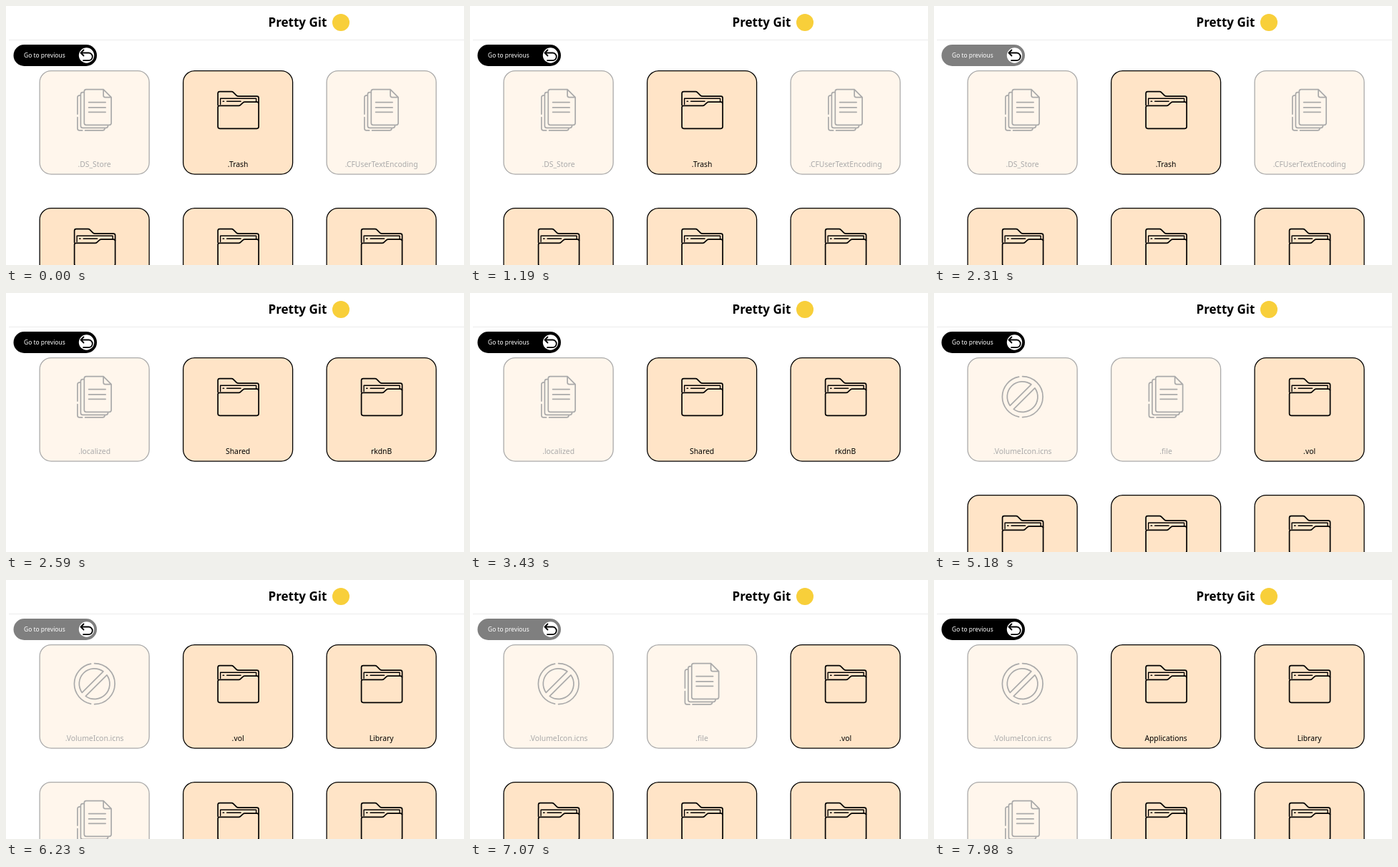
An HTML page that plays this animation: 640 by 362 pixels, repeating every 8000 ms.

```html
<!DOCTYPE html>
<html lang="en">
<head>
<meta charset="utf-8">
<title>Pretty Git</title>
<style>
  html, body { margin: 0; width: 100%; height: 100%; overflow: hidden; background: #fff; }
  svg { display: block; width: 640px; height: 362px; font-family: "Noto Sans", sans-serif; }
  .card { stroke: #000; stroke-width: 1.3; fill: #ffe4c7; }
  .icon { fill: none; stroke: #000; stroke-width: 1.7; stroke-linecap: round; stroke-linejoin: round; }
  .label { font-size: 10.35px; text-anchor: middle; }
  .off { opacity: .33; }
</style>
</head>
<body>
<svg viewBox="0 0 640 362">
  <defs>
    <!-- icons are drawn around the card's top centre -->
    <g id="folder" class="icon">
      <path d="M-28 48V31.500Q-28 29 -25.500 29H-9Q-7.500 29 -6.500 30L-2 34.500Q-1 35.500 1 35.500H26.500Q29 35.500 29 38V45"/>
      <path d="M-24.500 47V38.700H25.500V43.500M-21 42.700H-19.500M-15.500 42.700H4" stroke-width="1.400"/>
      <path d="M-28 51Q-28 48.700 -25.500 48.700H1Q2.500 48.700 3.500 47.700L7 44.500Q8 43.500 9.500 43.500H26.500Q29 43.500 29 46V78Q29 80.700 26.300 80.700H-25.300Q-28 80.700 -28 78Z"/>
    </g>
    <g id="file" class="icon">
      <path d="M-11.500 26H12.500L23.500 37V73Q23.500 75.800 20.700 75.800H-11.500Q-14.300 75.800 -14.300 73V28.800Q-14.300 26 -11.500 26ZM12.500 26V34.500Q12.500 37 15 37H23.500"/>
      <path d="M-8 44H15.500M-8 51.300H15.500M-8 57.700H15.500"/>
      <path d="M-15 30H-16.500Q-19.200 30 -19.200 33V77Q-19.200 79.800 -16.400 79.800H16Q18.700 79.800 19 76.500"/>
      <path d="M-20 34.300Q-23.700 34.300 -23.700 37.500V60.500M-23.700 65V80.500Q-23.700 83.300 -21 83.300H-17M-13 83.300H11.500Q14 83.300 14.500 80.500"/>
    </g>
    <g id="deny" class="icon" transform="translate(0 54.500)">
      <path d="M-5 -28A28.500 28.500 0 0 0 -5 28M0 28.500A28.500 28.500 0 1 0 0 -28.500"/>
      <path d="M-17.300 12.300A21.200 21.200 0 0 1 12.300 -17.300Z M17.300 -12.300A21.200 21.200 0 0 1 -12.300 17.300Z"/>
    </g>
  </defs>
  <path d="M4 47.500H640" stroke="#ebebeb"/>
  <text x="366.500" y="28.500" font-size="17" font-weight="600" textLength="auto">Pretty Git</text>
  <circle cx="468" cy="23" r="12" fill="#f8cf3a"/>
  <rect id="back" x="10.500" y="54" width="116.500" height="30" rx="15"/>
  <text x="25" y="71.700" font-size="8.450" fill="#fff">Go to previous</text>
  <circle cx="112.500" cy="69" r="10.700" fill="#fff"/>
  <path d="M108.500 61.500L104.500 65.500L108.500 69.500M105 65.500H115.500A5.300 5.300 0 0 1 115.500 76.100H108" fill="none" stroke="#000" stroke-width="1.800" stroke-linecap="round" stroke-linejoin="round"/>
  <g id="pages"></g>
</svg>
<script>
  const LOOP = 8000;
  const DIR = "folder", FILE = "file", DENY = "deny";
  const icns = [DENY, ".VolumeIcon.icns"];
  const dirs = [[DIR], [DIR], [DIR]];
  const fileFirst = [[FILE], [DIR], [DIR]];

  // start time and the cards in reading order
  const pages = [
    [0, [[FILE, ".DS_Store"], [DIR, ".Trash"], [FILE, ".CFUserTextEncoding"], ...dirs]],
    [2590, [[FILE, ".localized"], [DIR, "Shared"], [DIR, "rkdnB"]]],
    [5040, [icns, [FILE, ".file"], [DIR, ".vol"], ...dirs]],
    [5880, [icns, [DIR, ".vol"], [DIR, "Library"], ...fileFirst]],
    [6440, [icns, [FILE, ".file"], [DIR, ".vol"], ...dirs]],
    [7280, [icns, [DIR, "Applications"], [DIR, "Library"], ...fileFirst]]
  ];
  // button held down: from, to
  const presses = [[2310, 2590], [3220, 3360], [4830, 4900], [5670, 5740],
                   [6230, 6300], [7070, 7140], [7630, 7980]];

  function card([icon, label = ""], i) {
    const x = 123.6 + (i % 3) * 200.5;
    const y = 90.6 + Math.floor(i / 3) * 192;
    return `<g transform="translate(${x} ${y})" class="${icon === DIR ? "" : "off"}">
      <rect class="card" x="-76.500" width="153" height="144.500" rx="16"/>
      <use href="#${icon}"/><text class="label" y="134.200">${label}</text></g>`;
  }

  const host = document.getElementById("pages");
  const back = document.getElementById("back");
  host.innerHTML = pages.map(([, cards]) => `<g>${cards.map(card).join("")}</g>`).join("");
  const groups = [...host.children];

  function draw(now) {
    const t = now % LOOP;
    const current = pages.filter(([start]) => start <= t).length - 1;
    groups.forEach((g, i) => g.setAttribute("display", i === current ? "inline" : "none"));
    const down = presses.some(([from, to]) => t >= from && t < to);
    back.setAttribute("fill", down ? "#7f7f7f" : "#000");
  }

  let origin;
  function tick(now) {
    origin ??= now;
    draw(now - origin);
    requestAnimationFrame(tick);
  }
  draw(0);
  requestAnimationFrame(tick);
</script>
</body>
</html>
```
